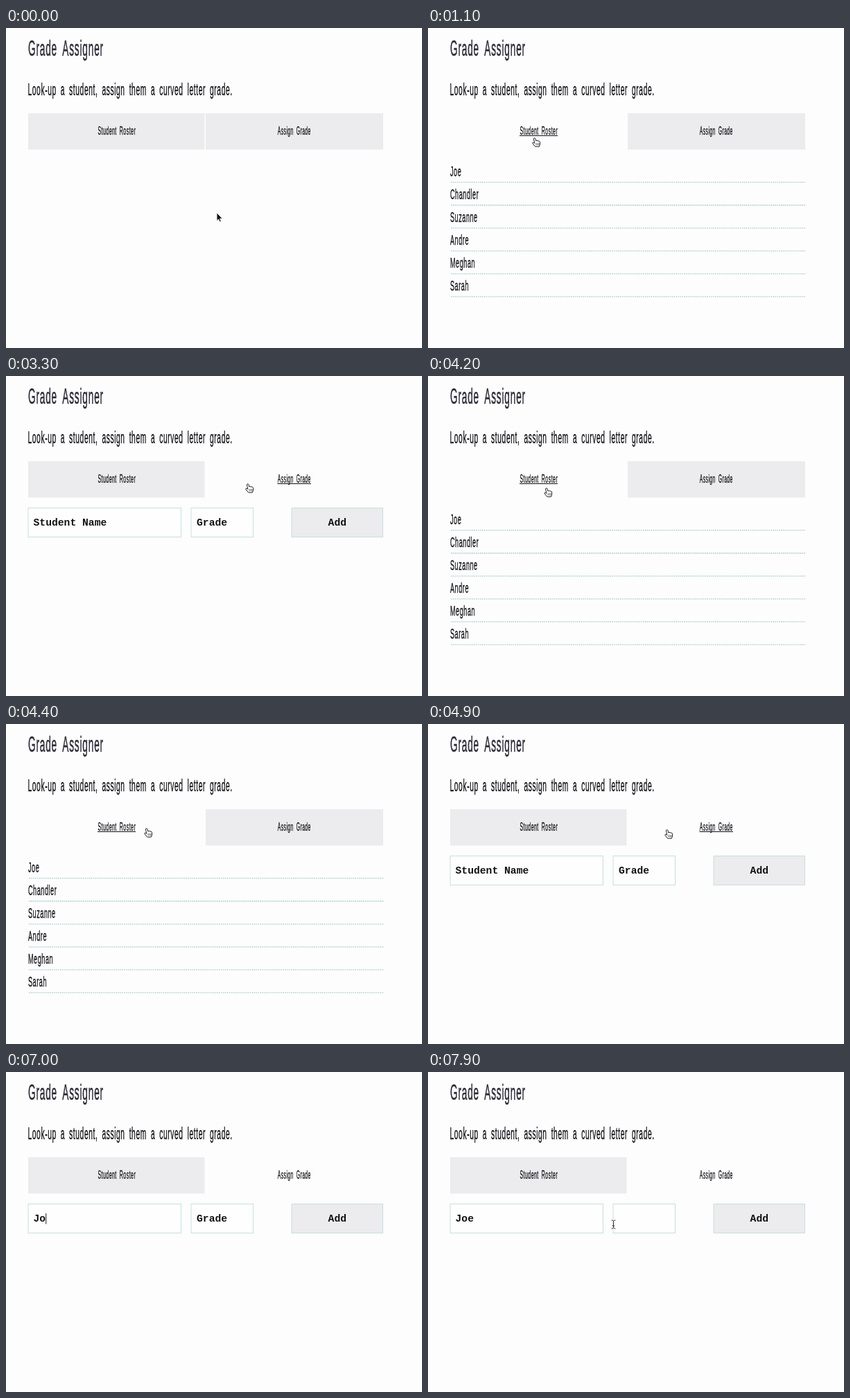
An HTML page that plays this animation: 600x462 px, repeating every 8 s.

```html
<!DOCTYPE html>
<html lang="en">
<head>
<meta charset="utf-8">
<title>Grade Assigner</title>
<style>
  html, body { margin: 0; width: 100%; height: 100%; overflow: hidden; background: #fefdfe; }
  svg { display: block; width: 100%; height: 100%; }
  .hand {
    font-family: "Liberation Sans", Arial, sans-serif; letter-spacing: .06em; word-spacing: .25em;
    fill: #14161a; stroke: #14161a; stroke-width: .02em; stroke-linejoin: round;
  }
  .title { fill: #2c2d38; stroke: #2c2d38; }
  .mono { font: bold 14.7px "Liberation Mono", "Courier New", monospace; fill: #111; }
  .tab, .button { fill: #ecebed; }
  .box { stroke: #c6e0dc; }
  .field { fill: #fefefe; }
  .rule { stroke: #93c6c1; stroke-width: 1.3; stroke-dasharray: 1.4 1.4; }
  .under { stroke: #14161a; }
  .ptr { stroke-linejoin: round; stroke-linecap: round; }
</style>
</head>
<body>
<svg id="stage" viewBox="0 0 600 462">
  <rect class="tab" id="tabL" x="32" y="123" width="254.5" height="52.5"/>
  <rect class="tab" id="tabR" x="288" y="123" width="256" height="52.5"/>
  <g id="labels"></g>
  <line class="under" id="underL" x1="132" x2="187" y1="155.5" y2="155.5"/>
  <line class="under" id="underR" x1="391.5" x2="440" y1="155.5" y2="155.5"/>
  <g id="roster"></g>
  <g id="form">
    <rect class="box field" x="32" y="190.5" width="220.5" height="42"/>
    <rect class="box field" x="267" y="190.5" width="89.5" height="42"/>
    <rect class="box button" x="412" y="190.5" width="131.5" height="42"/>
    <text class="mono" id="name" x="39.5" y="216"></text>
    <text class="mono" id="grade" x="275" y="216">Grade</text>
    <text class="mono" x="477.8" y="216" text-anchor="middle">Add</text>
    <rect id="caret" y="204" width="1.1" height="15.5" fill="#333"/>
  </g>
  <g id="pointer">
    <path class="ptr" id="arrow" fill="#111" stroke="#fff" stroke-width=".8"
      d="M0 0V11.4L2.6 9L4.3 13L6.3 12.2L4.6 8.2H8Z"/>
    <g class="ptr" id="finger" fill="#fff" stroke="#222">
      <path d="M-1 0Q.6-1 1 .8L1.8 4Q3 2.8 4 4Q5.2 3.2 6 4.5Q7.3 4 7.5 5.5V9L6.4 12.2H.6L-3 7.7Q-3.6 6 -1.8 6.2L-.2 7.4L-1.5 1.3Z"/>
      <path d="M2 7.5V10M4 7.5V10M5.8 7.5V10" fill="none" stroke-width=".7"/>
    </g>
    <path class="ptr" id="beam" fill="none" stroke="#333"
      d="M-2.5-6Q-.5-6 0-4.8Q.5-6 2.5-6M0-4.8V4.8M-2.5 6Q-.5 6 0 4.8Q.5 6 2.5 6M-1.5 2H1.5"/>
  </g>
</svg>
<script>
const LOOP = 8000, STEP = 100;
const NAME_FOCUS = 5700, TYPING = 6800, KEY_GAP = 200, GRADE_FOCUS = 7300;
const CHAR = 8.82, BLINK = 500, SAG = 12;
const ui = {};
document.querySelectorAll("[id]").forEach(el => ui[el.id] = el);

function add(parent, tag, attrs, text = "") {
  const el = document.createElementNS("http://www.w3.org/2000/svg", tag);
  for (const key in attrs) el.setAttribute(key, attrs[key]);
  el.textContent = text;
  parent.append(el);
}

// One narrow face shared by all handwritten labels
function hand(parent, text, x, y, size, anchor = "start", extra = "") {
  add(parent, "text", {
    class: "hand " + extra, "font-size": size, "text-anchor": anchor,
    transform: `translate(${x} ${y}) scale(.455 1.05)`
  }, text);
}

hand(ui.labels, "Grade Assigner", 32, 40, 30, "start", "title");
hand(ui.labels, "Look-up a student, assign them a curved letter grade.", 31.5, 97, 22.5);
hand(ui.labels, "Student Roster", 159.8, 154, 15.5, "middle");
hand(ui.labels, "Assign Grade", 415.8, 154, 15, "middle");

["Joe", "Chandler", "Suzanne", "Andre", "Meghan", "Sarah"].forEach((name, i) => {
  const y = 222.7 + i * 33.05;
  hand(ui.roster, name, 32, y - 8.7, 20);
  add(ui.roster, "line", { class: "rule", x1: 33, x2: 544, y1: y, y2: y });
});

// The pointer rests between moves; each eases to a new spot
const moves = [
  { from: 0, to: 700, x: 154, y: 159 },
  { from: 1400, to: 2100, x: 186, y: 300 },
  { from: 2300, to: 2600, x: 234, y: 313 },
  { from: 2600, to: 3200, x: 349, y: 156 },
  { from: 3500, to: 4000, x: 160, y: 152 },
  { from: 4100, to: 4400, x: 203, y: 151 },
  { from: 4400, to: 4800, x: 345, y: 153 },
  { from: 5000, to: 5800, x: 158, y: 218 },
  { from: 7400, to: 7900, x: 267.5, y: 220 }
];

function place(t) {
  let x = 304, y = 267;
  for (const m of moves) {
    if (t < m.from) break;
    const k = Math.min(1, (t - m.from) / (m.to - m.from));
    const ease = k * k * (3 - 2 * k);
    x += (m.x - x) * ease;
    y += (m.y - y) * ease + SAG * Math.sin(Math.PI * k);
  }
  return [x, y];
}

const between = (v, a, b) => v >= a && v < b;
const show = (el, on) => { el.style.display = on ? "" : "none"; };

function draw(t) {
  const [x, y] = place(t);
  const roster = between(t, 1000, 3300) || between(t, 4000, 4900);
  const form = t >= 1000 && !roster;
  const onTab = between(y, 123, 176) && between(x, 32, 544);
  const onField = form && between(y, 190, 233) && (between(x, 32, 253) || between(x, 267, 357));

  show(ui.tabL, !roster);
  show(ui.tabR, !form);
  show(ui.underL, onTab && x < 288);
  show(ui.underR, onTab && x >= 288);
  show(ui.roster, roster);
  show(ui.form, form);

  const keys = Math.max(0, Math.floor((t - TYPING) / KEY_GAP) + 1);
  const text = "Joe".slice(0, keys);
  const inGrade = t >= GRADE_FOCUS;
  const focus = inGrade ? GRADE_FOCUS : NAME_FOCUS;
  const typing = between(t, TYPING, GRADE_FOCUS);
  ui.name.textContent = t < NAME_FOCUS ? "Student Name" : text;
  show(ui.grade, !inGrade);
  show(ui.caret, t >= focus && (typing || (t - focus) % (2 * BLINK) < BLINK));
  ui.caret.setAttribute("x", inGrade ? 275 : 39.5 + text.length * CHAR);

  show(ui.pointer, !typing);
  ui.pointer.setAttribute("transform", `translate(${x} ${y})`);
  show(ui.finger, onTab);
  show(ui.beam, onField);
  show(ui.arrow, !onTab && !onField);
}

const start = performance.now();
function tick() {
  const t = (performance.now() - start) % LOOP;
  draw(Math.floor(t / STEP) * STEP);
  requestAnimationFrame(tick);
}
tick();
</script>
</body>
</html>
```
